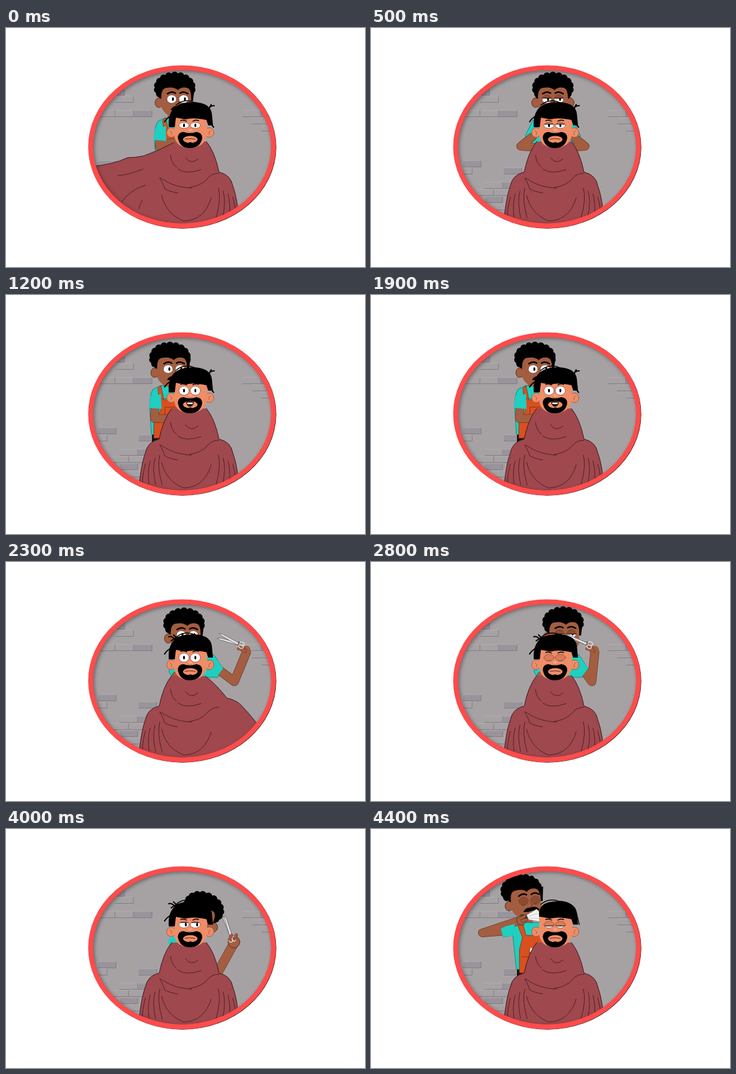
An HTML page with a canvas that plays this animation: 600 px wide and 400 px high, repeating every 4.5 s.

```html
<!DOCTYPE html>
<html lang="en">
<head>
<meta charset="utf-8">
<title>Barber shop</title>
<style>
html, body { margin: 0; width: 100%; height: 100%; overflow: hidden; background: #fff; }
canvas { display: block; width: 600px; height: 400px; }
</style>
</head>
<body>
<canvas id="stage" width="600" height="400"></canvas>
<script>
const ctx = document.getElementById('stage').getContext('2d');
const LOOP = 4500, STEP = 100, AXIS = 306;
const INK = '#000', SKIN = '#ee8d68', LID = '#dc7b58', BROWN = '#a35d40', BROWN_LID = '#8c4a31';
const TEAL = '#1fcfc0', APRON = '#d9501f', CAPE = '#9f484e', FOLD = '#35161a', EDGE = '#4a2415';

// Eased 0 to 1 between two times
function ramp(t, from, to) {
  const k = Math.min(1, Math.max(0, (t - from) / (to - from)));
  return k * k * (3 - 2 * k);
}
// Eased rise and fall around a moment
const pulse = (t, mid, reach) => 1 - ramp(Math.abs(t - mid), 0, reach);

function shape(d, fill, line, width = 0.8) {
  const p = new Path2D(d);
  if (fill) { ctx.fillStyle = fill; ctx.fill(p); }
  if (line) { ctx.strokeStyle = line; ctx.lineWidth = width; ctx.stroke(p); }
}
function oval(x, y, rx, ry, fill, line, width = 0.8) {
  ctx.beginPath();
  ctx.ellipse(x, y, rx, ry, 0, 0, 7);
  if (fill) { ctx.fillStyle = fill; ctx.fill(); }
  if (line) { ctx.strokeStyle = line; ctx.lineWidth = width; ctx.stroke(); }
}
function limb(d, width) {
  shape(d, null, EDGE, width + 1);
  shape(d, null, BROWN, width);
}
function at(x, y, turn, draw) {
  ctx.save();
  ctx.translate(x, y);
  ctx.rotate(turn);
  draw();
  ctx.restore();
}

// open: 0 closed to 1 wide
function eye(x, y, rx, ry, open, look, lid) {
  ctx.save();
  oval(x, y, rx, ry, '#fff');
  ctx.clip();
  oval(x + look, y, 1.6, 3, INK);
  const drop = 2 * ry * (1 - open);
  ctx.fillStyle = lid;
  ctx.fillRect(x - rx, y - ry, 2 * rx, drop);
  if (open < 0.95) shape(`M${x - rx} ${y - ry + drop}h${2 * rx}`, null, INK, 1);
  ctx.restore();
  oval(x, y, rx, ry, null, '#5a2a1c', 0.6);
}

// Rows of bricks, each row shifted by lean
function bricks(x, y, lean, rows, count) {
  for (let r = 0; r < rows; r++) {
    for (let i = 0; i < count; i++) {
      const bx = x + lean * r + 31 * i, by = y + 12 * r;
      if (r === 0 && i === count - 1) { ctx.fillStyle = '#99939b'; ctx.fillRect(bx, by, 30, 10); }
      shape(`M${bx} ${by}h30`, null, '#b3afb2');
      shape(`M${bx} ${by + 10.5}h30v-10`, null, '#77727a');
    }
  }
}
function wall() {
  ctx.fillStyle = '#a6a2a4';
  ctx.fillRect(130, 55, 330, 290);
  bricks(168, 102, 15, 2, 1);
  bricks(152, 138, 0, 1, 3);
  bricks(396, 138, 15.5, 3, 2);
  bricks(154, 222, -15, 2, 1);
  bricks(222, 234, 0, 1, 1);
  bricks(190, 258, -15, 2, 2);
  bricks(190, 282, 11, 2, 1);
}

function barberHead({ x, y, turn, face, open }) {
  at(x, y, turn, () => {
    oval(0, -12, 31, 22, INK);
    for (let i = 0; i < 13; i++) {
      const a = Math.PI * (0.84 + 1.32 * i / 12);
      oval(Math.cos(a) * 29, -10 + Math.sin(a) * 21, 6, 6, INK);
    }
    at(face * 0.5, 0, 0, () => {
      shape('M-31 -12h62l-3 24h-56z', INK);
      oval(-29, 15, 6.5, 8, BROWN, EDGE);
      if (face < 3) oval(29, 15, 6.5, 8, BROWN, EDGE);
      shape('M-25 6Q-25 -10 -15 -10Q-4 -12 3 -6Q8 -12 18 -10Q25 -8 25 6V24Q20 40 3 41Q-18 39 -25 22Z', BROWN);
    });
    at(face, 0, 0, () => {
      for (const s of [-1, 1]) {
        eye(s * 10, 9, 8, 7, open, 2, BROWN_LID);
        shape(`M${s * 17} 0Q${s * 10} -5 ${s * 4} -1`, null, INK, 2.6);
      }
      shape('M1 13q6 6 0 7', null, EDGE);
      shape('M-12 27q5 -8 13 -6q9 -3 15 5q-8 2 -13 0q-6 3 -15 1z', INK);
    });
  });
}

function scissors(x, y, turn, gap) {
  at(x, y, turn, () => {
    for (const s of [-1, 1]) {
      at(0, 0, s * gap, () => {
        shape('M-2 0L-1 -30Q0 -43 2 -30L2 0Z', '#e6e6e8', '#555', 0.7);
        oval(s * 3, 6, 3, 4, null, '#ddd', 1.5);
      });
    }
  });
}

const bodies = {
  side(p) {
    at(p.x - 274, (p.y - 116) * 0.3, 0, () => {
      shape('M244 205h20v45h-20z', '#111');
      shape('M262 135h20v30h-20z', BROWN);
      shape('M258 152L246 158Q240 165 240 188L243 234H290V154Z', TEAL, '#0c7770');
      shape('M254 156L259 152L264 176H285V240H247V204L258 196Z', APRON, '#7d2b10');
      shape('M258 174h24M266 188h16v16h-16z', null, '#7d2b10');
      const up = p.lift * 7;
      limb(`M249 190L248 ${207 - up}L270 ${207 - up * 2}`, 13);
      shape('M241 170L239 189L260 191L259 166Z', TEAL);
    });
  },
  back(p) {
    at(p.x - 304, 0, 0, () => {
      shape('M270 155L258 180L262 200H346L350 180L338 155Z', TEAL, '#0c7770');
      limb('M270 182L250 198L278 200', 13);
      limb('M338 182L358 198L330 200', 13);
    });
  },
  snip(p) {
    shape('M285 160L272 183L278 193H354L362 177L348 156Z', TEAL, '#0c7770');
    limb('M284 190L282 202', 12);
    limb(`M355 180L${369 + p.reach * 0.45} 200L${374 + p.reach} 151`, 14);
    shape('M335 165L347 156L363 178L353 191Z', TEAL);
  },
  snipHand(p) {
    at(p.reach, 0, 0, () => {
      oval(373, 148, 8, 8, BROWN);
      limb('M370 146L361 136M372 149L361 145', 4);
      scissors(360, 137, -1.2, p.gap);
    });
  },
  peek(p) {
    oval(279, 189, 8, 9, TEAL);
    limb('M354 240L380 193', 15);
    oval(381, 189, 10, 10, BROWN, EDGE);
    scissors(376, 179, -0.36, p.gap);
    limb('M374 184L377 178M383 183L385 177', 4);
  },
  brush() {
    shape('M244 225h24v25h-24z', '#111');
    shape('M246 140h25v28h-25z', BROWN);
    shape('M244 157L217 167L221 181L237 178L243 235H290V157Z', TEAL, '#0c7770');
    shape('M246 162L253 155L259 178H288V241H248V202L253 182Z', APRON, '#7d2b10');
    shape('M252 214h13v-13', null, '#7d2b10');
    oval(268, 203, 2.5, 4, '#eee');
    limb('M224 171L186 174L246 154', 13);
    shape('M224 163L217 167L221 181L240 178L240 159Z', TEAL);
  },
  brushHand(p) {
    at(0, p.bob, 0, () => {
      shape('M252 146L264 147', null, '#333', 6);
      shape('M260 144L277 134L285 144L282 155L264 152Z', '#f4f4f4', '#888');
      shape('M264 146L280 141M264 149L282 150', null, '#bbb');
      oval(251, 153, 7.5, 8, BROWN, EDGE);
      limb('M251 149L257 146M253 154L259 152', 4);
    });
  }
};

// One side of the cape, from hanging (pull 0) to held out (pull 1)
function capeSide(side, pull) {
  const mix = (a, b) => a + (b - a) * pull;
  const pt = (x, y, px, py) => `${AXIS + side * mix(x, px)} ${mix(y, py)} `;
  const line = 'M' + pt(29, 190, 26, 192) +
    'Q' + pt(43, 207, 50, 205) + pt(50, 241, 76, 214) +
    'Q' + pt(70, 246, 90, 217) + pt(73, 264, 103, 217) +
    'Q' + pt(82, 288, 128, 229) + pt(85, 340, 166, 232);
  const inner = AXIS - side;
  shape(`${line}V345H${inner}V190Z`, CAPE);
  shape(line, null, FOLD, 1);
  if (pull < 0.3) {
    for (let i = 0; i < 4; i++) {
      const x = AXIS + side * (49 + 8 * i), y = 268 + 5 * i;
      shape(`M${x} ${y}q${side * 5} 18 ${side * (3 * i - 4)} ${50 - 6 * i}`, null, FOLD);
    }
  } else if (pull > 0.7) {
    at(AXIS, 0, 0, () => {
      ctx.scale(side, 1);
      shape('M119 247Q101 246 77 236M113 292Q101 272 73 263M84 303Q83 296 78 288', null, FOLD);
    });
  }
}
function cape(left, right) {
  capeSide(-1, left);
  capeSide(1, right);
  shape('M300 217Q309 230 321 219M287 236Q301 246 326 237M275 213Q276 226 285 233' +
    'M258 251C268 256 278 266 310 268M257 251Q264 263 265 269Q273 274 287 276' +
    'M356 243Q343 243 336 253Q326 264 306 267M260 280Q268 312 297 323Q332 322 343 284', null, FOLD);
}

function client(p) {
  at(0, p.down, 0, () => {
    for (const s of [-1, 1]) {
      oval(308 + s * 32, 172, 7.5, 8, SKIN, '#9b4e32');
      shape(`M${308 + s * 34} 169q${-s * 5} 2 ${-s * 2} 7`, null, '#9b4e32');
    }
    shape('M281 145V176Q283 197 307 198Q332 197 336 176V145Z', SKIN);
    const [x, y] = p.trimmed ? [281, 147] : [272, 163];
    shape(`M${x} ${y}Q${x - 3} 121 311 121Q341 121 344 140L346 160H338L335 151Q312 146 300 150L284 147L282 ${y}Z`, INK);
    shape('M284 126Q299 114 316 122', null, INK, 1.5);
    if (p.trimmed) shape('M315 121Q340 121 345 147L348 160', null, INK, 1.4);
    else {
      shape('M274 145Q268 149 265 154', null, INK, 2);
      shape(p.flick > 0 ? 'M336 136Q341 126 348 127M338 134L343 125M342 157L347 163'
        : 'M283 130Q278 124 272 125M285 127L280 122M276 132Q282 127 295 124', null, INK, 2);
    }
    for (const s of [-1, 1]) {
      eye(307 + s * 9.5, 160, 8.5, p.ry, p.open, p.look, LID);
      shape(`M${307 + s * 15} ${157 - p.ry}q${-s * 5} -2 ${-s * 10} 1`, null, INK, 1.4);
    }
    oval(308, 169, 4, 3, '#f4a283');
    shape('M304 170q4 4 7 0', null, '#a6513a');
    shape('M287 180Q288 171 297 171Q307 175 318 171Q328 172 328 181Q325 198 307 198Q290 198 287 180Z', INK);
    oval(308, 183.5, 12, 6, SKIN);
    shape('M303 191Q308 185 313 191Z', INK);
    if (p.talk) {
      shape('M301 179Q307 177 314 179Q313 187 307 187Q302 186 301 179Z', '#241010');
      shape('M303 180h9v2.5h-9z', '#fff');
    } else shape('M299 183Q307 181 316 183', null, '#5b2418', 1);
  });
}

function poseAt(t) {
  if (t < 300) return 'side';
  if (t < 1000) return 'back';
  if (t < 2200) return 'side';
  if (t < 3800) return 'snip';
  return t < 4200 ? 'peek' : 'brush';
}

function ring() {
  oval(294.2, 198.8, 152.9, 132.4, null, '#fd4c4c', 8);
}

function draw(t) {
  ctx.fillStyle = '#fff';
  ctx.fillRect(0, 0, 600, 400);
  ctx.lineJoin = ctx.lineCap = 'round';
  oval(294.9, 199.4, 156.8, 136.3, '#2a1416');

  // Progress of each move: tie, step left, step right, duck, pop up with the brush
  const tie = ramp(t, 0, 500), aside = ramp(t, 700, 1100), cross = ramp(t, 2100, 2500);
  const duck = ramp(t, 3400, 3900), pop = ramp(t, 4000, 4200), doze = ramp(t, 2300, 2600);
  const left = pulse(t, 0, 300) + pulse(t, 1050, 150) + pulse(t, 1500, 300);
  const right = pulse(t, 300, 200) + pulse(t, 800, 200) + pulse(t, 2200, 200);
  const sway = t > 2800 ? Math.sin(Math.PI * (t - 2800) / 400) ** 2 : 0;
  const barber = {
    x: 282 + 22 * tie - 30 * aside + 47 * cross + 6 * duck - 75 * pop,
    y: 110 + 5 * aside - 4 * cross + 30 * duck - 29 * pop,
    turn: 0.38 * duck - 0.48 * pop,
    face: 5 - 5 * tie + 7 * aside - 3 * cross - 7 * duck + 15 * pop,
    open: 1 - 0.4 * tie + 0.4 * aside - 0.55 * doze - 0.45 * pop,
    lift: Math.max(left, right),
    reach: 46 * pulse(t, 2450, 350) + 24 * sway,
    gap: 0.04 + 0.08 * (t / STEP % 2),
    bob: 2 - 2 * ramp(t, 4200, 4300)
  };
  const pose = poseAt(t);

  ctx.save();
  ctx.beginPath();
  ctx.ellipse(294.2, 198.8, 151, 131, 0, 0, 7);
  ctx.clip();
  wall();
  bodies[pose](barber);
  barberHead(barber);
  bodies[pose + 'Hand']?.(barber);
  cape(left, right);
  client({
    down: 3 - 3 * aside,
    ry: 5 + 2.5 * aside - 2 * doze,
    open: 1 - 0.3 * tie + 0.3 * aside - doze + 0.8 * duck - 0.5 * pop,
    look: 3 * (duck - pop),
    trimmed: t >= 4200,
    flick: t < 2300 ? 1 : -1,
    talk: t >= 1100 && t < 2200
  });
  ctx.shadowColor = 'rgba(0,0,0,.4)';
  ctx.shadowBlur = 6;
  ctx.shadowOffsetX = ctx.shadowOffsetY = 2;
  ring();
  ctx.restore();
  ring();
}

const start = performance.now();
function tick() {
  const t = (performance.now() - start) % LOOP;
  draw(Math.floor(t / STEP) * STEP);
  requestAnimationFrame(tick);
}
tick();
</script>
</body>
</html>
```
